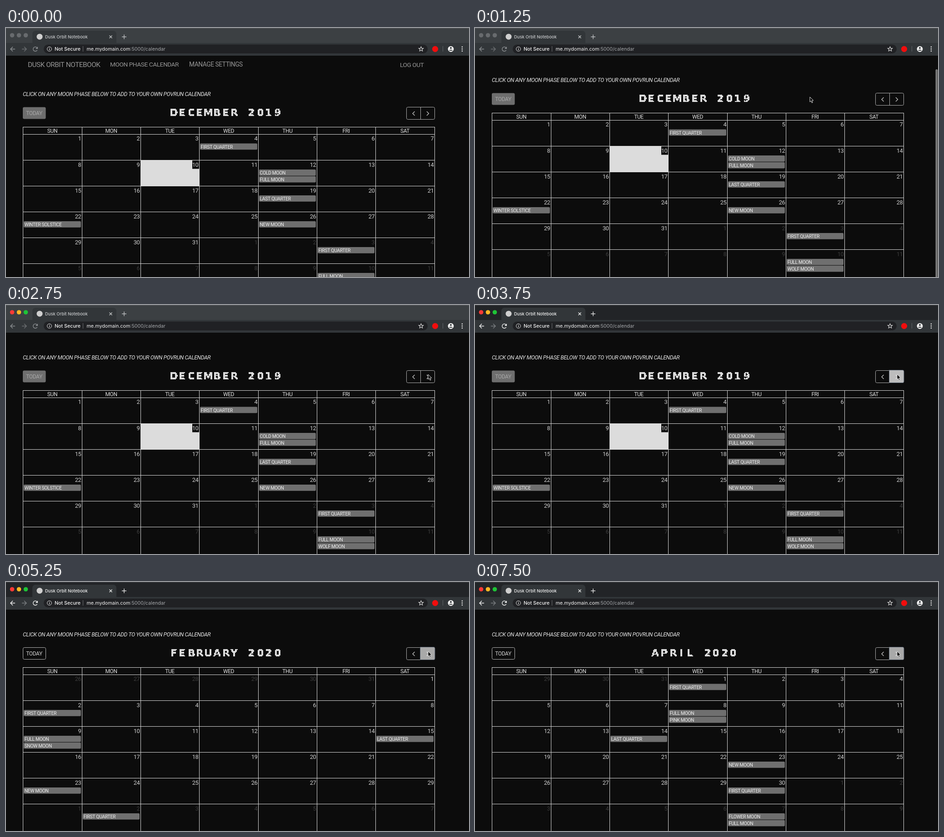
An HTML page with a canvas for the animation above (8 s loop, 1019 by 549 pixels).

```html
<!DOCTYPE html>
<html lang="en">
<head>
<meta charset="utf-8">
<title>Dusk Orbit Notebook</title>
<style>
  html, body { margin: 0; width: 100%; height: 100%; overflow: hidden; background: #0c0c0c; }
  canvas { display: block; }
</style>
</head>
<body>
<canvas id="stage" width="1019" height="549"></canvas>
<script>
const ctx = document.getElementById('stage').getContext('2d');
const LOOP = 8000, LEFT = 37, RIGHT = 943;
const BRAND = 'Dusk Orbit Notebook';
const MONTHS = ['JANUARY', 'FEBRUARY', 'MARCH', 'APRIL', 'MAY', 'JUNE', 'JULY',
  'AUGUST', 'SEPTEMBER', 'OCTOBER', 'NOVEMBER', 'DECEMBER'];
const DAYS = ['SUN', 'MON', 'TUE', 'WED', 'THU', 'FRI', 'SAT'];
const colX = i => Math.round(37.3 + 129.35 * i);

// Moon events by month/day
const EVENTS = {};
const addEvents = (name, days) =>
  days.split(' ').forEach(d => (EVENTS[d] = EVENTS[d] || []).push(name));
addEvents('COLD MOON', '12/12');
addEvents('FLOWER MOON', '5/7');
addEvents('FULL MOON', '12/12 1/10 2/9 3/9 4/8 5/7');
addEvents('FIRST QUARTER', '12/4 1/3 2/2 3/2 4/1 4/30');
addEvents('LAST QUARTER', '12/19 1/17 2/15 3/16 4/14');
addEvents('NEW MOON', '12/26 1/24 2/23 3/24 4/23');
addEvents('WOLF MOON', '1/10');
addEvents('SNOW MOON', '2/9');
addEvents('WORM MOON', '3/9');
addEvents('PINK MOON', '4/8');
addEvents('WINTER SOLSTICE', '12/22');
addEvents('VERNAL EQUINOX', '3/20');

// Timelines: [start time, value], each value holds until the next
const SCROLL = [[0, 0], [1250, 31], [1500, 32], [1750, 31], [2000, 30]];
const SCROLLBAR = [[0, 0], [1250, 1], [1750, .5], [2000, 0]];
const MONTH = [[0, 0], [4000, 1], [5250, 2], [6250, 3], [7250, 4]];
const BUTTON = [[0, ''], [3750, '#bdbdbd'], [4000, '#a9a9a9'], [5000, '#bdbdbd'], [5250, '#a9a9a9']];
const CURSOR = [[0, null], [500, [717, 54]], [750, [725, 131]], [1000, [737, 152]],
  [1500, [822, 165]], [1750, [900, 175]], [2000, [935, 176]], [2250, [929, 153]]];
const at = (line, t) => line.reduce((v, [start, next]) => t >= start ? next : v, line[0][1]);

function rect(x, y, w, h, color) {
  ctx.fillStyle = color;
  ctx.fillRect(x, y, w, h);
}

function box(x, y, w, h, radius, fill, stroke) {
  ctx.beginPath();
  ctx.roundRect(x, y, w, h, radius);
  paint(fill, stroke);
}

function paint(fill, stroke, width = 1) {
  if (fill) { ctx.fillStyle = fill; ctx.fill(); }
  if (stroke) { ctx.strokeStyle = stroke; ctx.lineWidth = width; ctx.stroke(); }
}

function disc(x, y, r, fill, stroke) {
  ctx.beginPath();
  ctx.arc(x, y, r, 0, 7);
  paint(fill, stroke);
}

function line(points, color, width = 1.3) {
  ctx.beginPath();
  points.forEach(([x, y]) => ctx.lineTo(x, y));
  paint(null, color, width);
}

// Text centred vertically on y
function text(str, x, y, size, color, align = 'left', font = 'Roboto', style = '') {
  ctx.font = `${style} ${size}px ${font}, sans-serif`;
  ctx.letterSpacing = font === 'Roboto' ? -.033 * size + 'px' : '0px';
  ctx.textAlign = align;
  ctx.fillStyle = color;
  ctx.fillText(str, x, y + size * .36);
}

// Monospaced pixel lettering: small text with hard edges, shown at double size
const small = new OffscreenCanvas(140, 12).getContext('2d', { willReadFrequently: true });
function drawTitle(str) {
  const pitch = 9.5;
  small.clearRect(0, 0, 140, 12);
  small.font = 'bold 11px "DejaVu Sans", sans-serif';
  small.fillStyle = '#dcdcdc';
  [...str].forEach((c, i) =>
    small.fillText(c, Math.round((i + .5) * pitch - small.measureText(c).width / 2), 9));
  const pixels = small.getImageData(0, 0, 140, 12);
  for (let i = 3; i < pixels.data.length; i += 4) pixels.data[i] = pixels.data[i] > 105 ? 255 : 0;
  small.putImageData(pixels, 0, 0);
  ctx.imageSmoothingEnabled = false;
  ctx.drawImage(small.canvas, Math.round(483 - str.length * pitch), 176, 280, 24);
}

function drawButtons(current, pressed) {
  if (current) {
    box(37, 174.5, 50.5, 26, 3, '#6e6e6e');
    text('TODAY', 62, 188, 12, '#a8a8a8', 'center');
  } else {
    box(37.5, 174.5, 50, 26, 3, null, '#b8b8b8');
    text('TODAY', 62, 188, 12, '#d0d0d0', 'center');
  }
  box(881.5, 174.5, 62, 27, 3, null, '#b0b0b0');
  rect(912, 175, 1, 26, '#b0b0b0');
  if (pressed) box(911.5, 173.5, 32.5, 28, [0, 3, 3, 0], pressed, '#56606e');
  line([[899.5, 184], [895, 188.5], [899.5, 193]], '#c8c8c8');
  line([[926, 184], [930.5, 188.5], [926, 193]], pressed ? '#ececec' : '#c8c8c8');
}

function drawCalendar(offset) {
  const first = new Date(2019, 11 + offset, 1);
  drawTitle(MONTHS[first.getMonth()] + ' ' + first.getFullYear());
  DAYS.forEach((d, i) => text(d, (colX(i) + colX(i + 1)) / 2, 226.5, 12, '#dedede', 'center'));

  for (let i = 0; i < 42; i++) {
    const date = new Date(first.getFullYear(), first.getMonth(), 1 - first.getDay() + i);
    const row = Math.floor(i / 7), x = colX(i % 7), right = colX(i % 7 + 1);
    const y = row ? 234.5 + 57 * row : 234;
    const key = date.getMonth() + 1 + '/' + date.getDate();
    if (key === '12/10') {
      rect(x, 292, right - x, 57, '#dcdcdc');
      rect(410, 292, 15, 18.5, '#0c0c0c');
    }
    const inMonth = date.getMonth() === first.getMonth();
    text(date.getDate(), right - 1.5, y + 9.7, 13, inMonth ? '#cfcfcf' : '#3c3c3c', 'right');
    (EVENTS[key] || []).forEach((name, n) => {
      const top = y + 20.5 + 14.7 * n;
      box(x + 2, top, right - x - 4, 13.7, 2, '#6f6f6f');
      text(name, x + 3.5, top + 7.3, 10.4, '#f0f0f0');
    });
  }

  const grid = '#dadada';
  for (let i = 0; i < 8; i++) rect(colX(i), 218, 1, 400, grid);
  rect(LEFT, 218, RIGHT - LEFT + 1, 1, grid);
  for (let i = 0; i < 6; i++) rect(LEFT, 234 + 57 * i, RIGHT - LEFT + 1, 1, grid);
}

function drawPage(t) {
  const month = at(MONTH, t);
  rect(0, 0, 1019, 549, '#0c0c0c');
  ctx.save();
  ctx.translate(0, -at(SCROLL, t));
  text(BRAND.toUpperCase(), 48, 80.5, 15.4, '#969696');
  text('MOON PHASE CALENDAR', 229, 80.5, 13.7, '#969696');
  text('MANAGE SETTINGS', 403, 80.5, 13.8, '#969696');
  text('LOG OUT', 867, 81, 13.7, '#969696');
  text('CLICK ON ANY MOON PHASE BELOW TO ADD TO YOUR OWN POVRUN CALENDAR',
    37, 145.5, 12.3, '#e4e4e4', 'left', 'Roboto', 'italic');
  drawButtons(month === 0, at(BUTTON, t));
  drawCalendar(month);
  ctx.restore();
  ctx.globalAlpha = at(SCROLLBAR, t);
  box(1013.5, 91, 5, 470, 2.5, '#777');
  ctx.globalAlpha = 1;
}

function drawTabs(t, active) {
  rect(0, 0, 1019, 34, active ? '#222427' : '#3c4043');
  rect(0, 0, 1019, 1, active ? '#414347' : '#585b5e');
  box(58, 6, 185, 40, 7, '#323639');
  rect(0, 33, 1019, 28, '#323639');
  ['#fd3a35', '#fdb924', '#1ec437'].forEach((c, i) =>
    disc(13.5 + 15 * i, 16, 4.8, t >= 2750 ? c : '#686b6e'));
  disc(74, 19.2, 6.5, '#cfcfcf');
  const ink = active ? '#f4f4f4' : '#c8cacc';
  text(BRAND, 86, 19.2, 9.4, ink, 'left', 'Inter', '500');
  line([[227.5, 16.5], [233.5, 22.5]], ink);
  line([[233.5, 16.5], [227.5, 22.5]], ink);
  line([[255, 19.5], [265, 19.5]], ink);
  line([[260, 14.5], [260, 24.5]], ink);
}

function drawArrow(x, dir, color) {
  line([[x - 5 * dir, 46.5], [x + 5 * dir, 46.5]], color, 1.5);
  line([[x, 41.5], [x + 5 * dir, 46.5], [x, 51.5]], color, 1.5);
}

function drawStar(x, y) {
  ctx.beginPath();
  for (let i = 0; i < 10; i++) {
    const a = i * Math.PI / 5 - Math.PI / 2, r = i % 2 ? 2.3 : 5.4;
    ctx.lineTo(x + r * Math.cos(a), y + r * Math.sin(a));
  }
  ctx.closePath();
  paint(null, '#e0e0e0', 1.1);
}

function drawToolbar(active) {
  const ink = active ? '#f1f1f1' : '#8b8e91';
  drawArrow(15, -1, ink);
  drawArrow(40, 1, active ? '#7b7e81' : '#6c6f72');
  ctx.beginPath();
  ctx.arc(64.5, 46.5, 4.7, .5, 5.5);
  paint(null, ink, 1.5);
  ctx.beginPath();
  ctx.moveTo(70, 41);
  ctx.lineTo(70, 46);
  ctx.lineTo(65, 46);
  paint(ink);

  box(83, 36.5, 845, 19.5, 9.75, '#202124');
  disc(95.5, 46.3, 4.9, null, '#e8e8e8');
  rect(95, 45.5, 1.2, 3.5, '#e8e8e8');
  rect(95, 43.3, 1.2, 1.2, '#e8e8e8');
  text('Not Secure', 107, 46.3, 10.7, '#f4f4f4', 'left', 'Inter', '500');
  rect(169, 40, 1, 12, '#6a6c6f');
  const host = 'me.mydomain.com';
  text(host, 177.5, 46.3, 10.7, '#f4f4f4', 'left', 'Inter');
  text(':5000/calendar', 177.5 + ctx.measureText(host).width, 46.3, 10.7, '#a4a7aa', 'left', 'Inter');
  drawStar(913.5, 46.5);

  disc(944.5, 46.3, 6.6, '#f20d0d');
  rect(961, 40, 1, 12, '#606366');
  disc(979, 46.3, 6.4, '#f1f1f1');
  disc(979, 44, 2, '#323639');
  ctx.beginPath();
  ctx.ellipse(979, 50, 3.9, 2, 0, Math.PI, 0);
  paint('#323639');
  [41.8, 46.3, 50.8].forEach(y => disc(1004, y, 1.3, '#f1f1f1'));
}

function drawCursor([x, y]) {
  ctx.save();
  ctx.translate(x, y);
  ctx.beginPath();
  [[0, 0], [0, 11], [2.5, 8.8], [4.4, 13], [6.2, 12.2], [4.4, 8.1], [7.8, 7.8]]
    .forEach(p => ctx.lineTo(...p));
  ctx.closePath();
  paint('#050505', '#dedede');
  ctx.restore();
}

function frame(now) {
  const t = now % LOOP, active = t >= 3000, cursor = at(CURSOR, t);
  drawPage(t);
  drawTabs(t, active);
  drawToolbar(active);
  if (cursor) drawCursor(cursor);
  requestAnimationFrame(frame);
}
frame(0);
</script>
</body>
</html>
```
